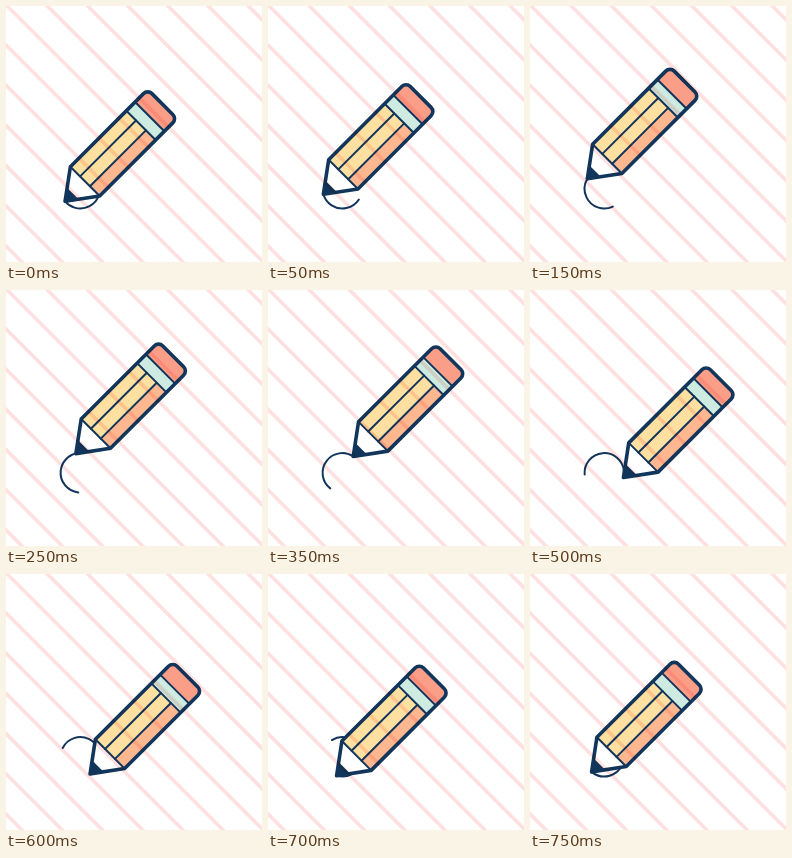
Animation of 256 by 256 pixels, one loop 800 ms. Source, as an HTML page with a canvas:

```html
<!DOCTYPE html>
<html lang="en">
<head>
<meta charset="utf-8">
<title>Drawing pencil</title>
<style>
  html, body { margin: 0; width: 100%; height: 100%; overflow: hidden; background: #fff; }
  canvas { display: block; width: 256px; height: 256px; }
</style>
</head>
<body>
<canvas id="stage" width="256" height="256"></canvas>
<script>
const ctx = document.getElementById('stage').getContext('2d');
const LOOP = 800, STEP = 50;
const CENTER = { x: 74.3, y: 182.8 }, RADIUS = 19.7;
const NAVY = '#12355b', YELLOW = '#ffe0a0', ORANGE = '#ffb78f';
const MINT = '#cdebe0', CORAL = '#fb9e87', PINK = '#ffe0e0';
// Distances along the pencil axis, measured from its tip.
const NIB = 11, SHOULDER = 28.2, FERRULE = 107.3, ERASER = 119.7, END = 137.6;
// Distances across it, measured from the axis.
const HALF = 20.7, RIDGE = 7;
const rad = deg => deg * Math.PI / 180;

function line(points, width) {
  ctx.beginPath();
  points.forEach(([x, y]) => ctx.lineTo(x, y));
  ctx.lineWidth = width;
  ctx.stroke();
}

function band(from, to, top, bottom, color) {
  ctx.fillStyle = color;
  ctx.fillRect(from, top, to - from, bottom - top);
}

function outline() {
  ctx.beginPath();
  ctx.moveTo(0, 0);
  ctx.lineTo(SHOULDER, -HALF);
  ctx.arcTo(END, -HALF, END, 0, 6);
  ctx.arcTo(END, HALF, SHOULDER, HALF, 6);
  ctx.lineTo(SHOULDER, HALF);
  ctx.closePath();
}

function pencil(x, y) {
  ctx.save();
  ctx.translate(x, y);
  ctx.rotate(-Math.PI / 4);
  ctx.strokeStyle = NAVY;
  ctx.lineJoin = ctx.lineCap = 'round';

  ctx.save();
  outline();
  ctx.clip();
  band(0, SHOULDER, -HALF, HALF, '#fff');
  band(SHOULDER, FERRULE, -HALF, RIDGE, YELLOW);
  band(SHOULDER, FERRULE, RIDGE, HALF, ORANGE);
  band(FERRULE, ERASER, -HALF, HALF, MINT);
  band(ERASER, END, -HALF, HALF, CORAL);
  band(0, NIB, -HALF, HALF, NAVY);
  for (const at of [SHOULDER, FERRULE, ERASER]) line([[at, -HALF], [at, HALF]], 2);
  for (const side of [-RIDGE, RIDGE]) line([[SHOULDER, side], [FERRULE, side]], 2);
  ctx.restore();

  outline();
  ctx.lineWidth = 3.6;
  ctx.stroke();
  ctx.restore();
}

function stripes() {
  ctx.save();
  ctx.globalCompositeOperation = 'multiply';
  ctx.strokeStyle = PINK;
  for (let k = -7; k < 7; k++) {
    const x = 1.2 + 40.2 * k;
    line([[x - 10, -10], [x + 270, 270]], 3.6);
  }
  ctx.restore();
}

function draw(now) {
  const step = Math.floor((now % LOOP) / STEP);
  const head = rad(140.6 + 23.3 * step);
  const tail = rad(17 + 15.8 * step);

  ctx.fillStyle = '#fff';
  ctx.fillRect(0, 0, 256, 256);

  ctx.beginPath();
  ctx.arc(CENTER.x, CENTER.y, RADIUS, tail, head);
  ctx.strokeStyle = NAVY;
  ctx.lineWidth = 2;
  ctx.lineCap = 'round';
  ctx.stroke();

  pencil(CENTER.x + RADIUS * Math.cos(head), CENTER.y + RADIUS * Math.sin(head));
  stripes();
}

const start = performance.now();
function tick() {
  draw(performance.now() - start);
  requestAnimationFrame(tick);
}
tick();
</script>
</body>
</html>
```
